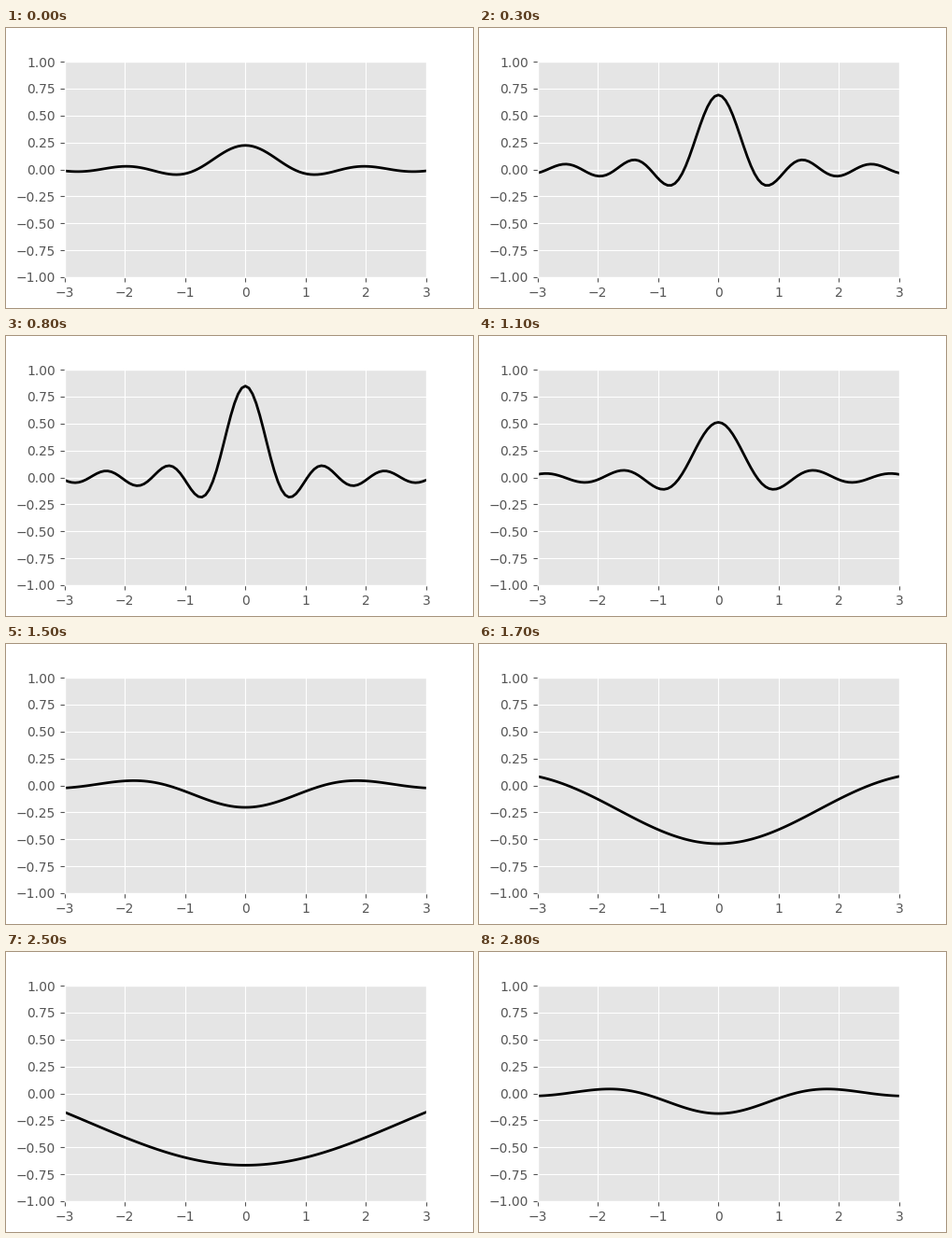
Animation, 500 px wide and 300 px high, one loop 2900 ms. Source, as a matplotlib script:

```python
import numpy as np
import matplotlib.pyplot as plt
from matplotlib.animation import FuncAnimation

FRAMES = 29
INTERVAL = 100  # ms
START, STEP = 0.25, 0.208  # phase in radians

plt.style.use("ggplot")

fig, ax = plt.subplots(figsize=(5, 3), dpi=100)
ax.set_xlim(-3, 3)
ax.set_ylim(-1, 1)
ax.set_xticks(np.arange(-3, 4))
ax.set_yticks(np.linspace(-1, 1, 9))

x = np.linspace(-3, 3, 101)
line, = ax.plot([], [], color="black", lw=2)


def update(i):
    # The wave's height and its frequency swing together.
    swing = np.sin(START + STEP * i)
    line.set_data(x, 0.9 * swing * np.sinc((1 + swing) * x))
    return line,


anim = FuncAnimation(fig, update, frames=FRAMES, interval=INTERVAL,
                     repeat=True, repeat_delay=0)
plt.show()
```
